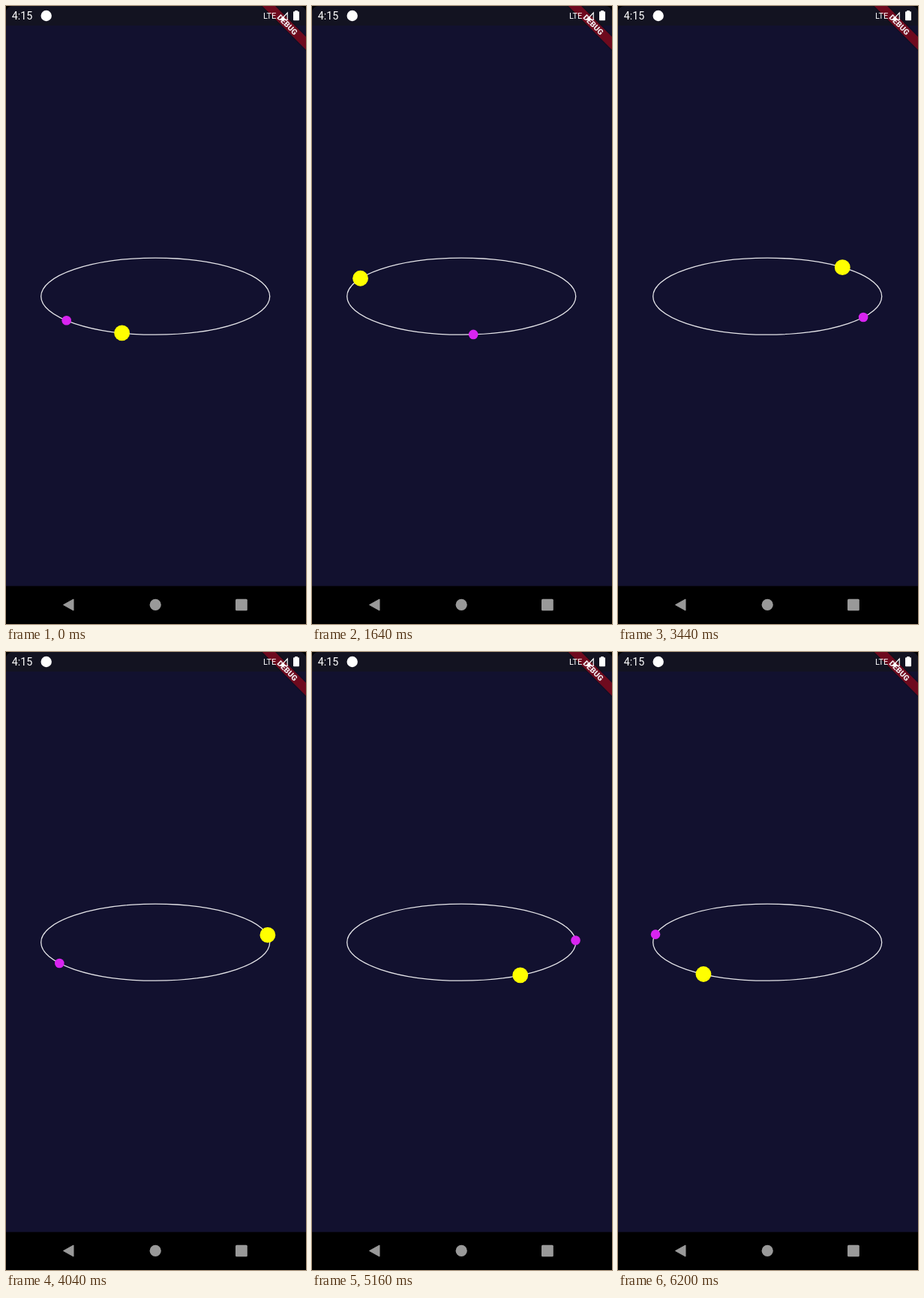
Animation of 400x822 px, one loop 6240 ms. Source, as an HTML page:

```html
<!DOCTYPE html>
<html lang="en">
<head>
<meta charset="utf-8">
<title>Orbit</title>
<style>
  html, body { margin: 0; width: 100%; height: 100%; overflow: hidden; background: #000; }
  svg { display: block; width: 100%; height: 100%; font-family: Roboto, sans-serif; }
</style>
</head>
<body>
<svg viewBox="0 0 400 822">
  <path d="M0 771.5V10Q0 0 10 0H390Q400 0 400 10V771.5Z" fill="#12112f"/>
  <path d="M0 26V10Q0 0 10 0H390Q400 0 400 10V26Z" fill="#131321"/>

  <!-- corner ribbon -->
  <g transform="translate(375.2 24.8) rotate(45)">
    <rect x="-60" y="-7.5" width="120" height="15" fill="#000" opacity=".2"/>
    <rect x="-60" y="-6.1" width="120" height="12.2" fill="#6e0a1e"/>
    <text y="3.7" font-size="10.4" font-weight="900" text-anchor="middle" fill="#f0e8ec">DEBUG</text>
  </g>

  <!-- status bar -->
  <g fill="#fff">
    <text x="7.7" y="18.2" font-size="14.3">4:15</text>
    <circle cx="53.7" cy="13" r="7.2"/>
    <text x="343" y="17.2" font-size="11">LTE</text>
    <path d="M365 19L371 13V19Z"/>
    <path d="M366.5 18.4L375.2 9V18.4Z" fill="none" stroke="#fff" stroke-width="1.2"/>
    <rect x="383" y="7.3" width="8" height="12" rx="1"/>
    <rect x="385.2" y="6" width="3.6" height="2"/>
  </g>

  <ellipse cx="199.2" cy="386.2" rx="152.5" ry="51" fill="none" stroke="#e6e6ea" stroke-width="1.3"/>
  <circle id="sun" r="10.4" fill="#ff0"/>
  <circle id="moon" r="6.3" fill="#d824f0"/>

  <!-- navigation bar -->
  <g fill="#999">
    <path d="M76.5 796.5L90 789V804Z" stroke="#999" stroke-linejoin="round"/>
    <circle cx="199.2" cy="796.4" r="7.6"/>
    <rect x="306" y="788.8" width="15.8" height="15.4" rx="1.5"/>
  </g>
</svg>
<script>
  const LOOP = 6240, SLOT = 40;
  // Sun angle in degrees at some ticks; its speed wavers a little
  const knots = [[0, 107], [13, 147], [26, 189], [33, 208], [39, 225], [48, 251], [52, 265],
    [65, 303], [69, 311], [78, 340], [81, 349], [91, 382], [103, 419], [117, 462], [124, 484]];
  const sun = document.getElementById('sun'), moon = document.getElementById('moon');

  function angleAt(tick) {
    const i = Math.max(1, knots.findIndex(k => k[0] >= tick));
    const [t0, a0] = knots[i - 1], [t1, a1] = knots[i];
    return Math.round(a0 + (a1 - a0) * (tick - t0) / (t1 - t0));
  }

  function place(ball, degrees) {
    const a = degrees * Math.PI / 180;
    ball.setAttribute('cx', 199.2 + 152.5 * Math.cos(a));
    ball.setAttribute('cy', 386.2 + 51 * Math.sin(a));
  }

  function draw() {
    // 50 ms ticks, each shown from the nearest 40 ms slot
    const slot = Math.floor(performance.now() % LOOP / SLOT);
    const tick = Math.ceil((slot + 0.5) / 1.25) - 1;
    const angle = angleAt(tick);
    place(sun, angle);
    place(moon, 3 * angle + 180);
    requestAnimationFrame(draw);
  }
  draw();
</script>
</body>
</html>
```
